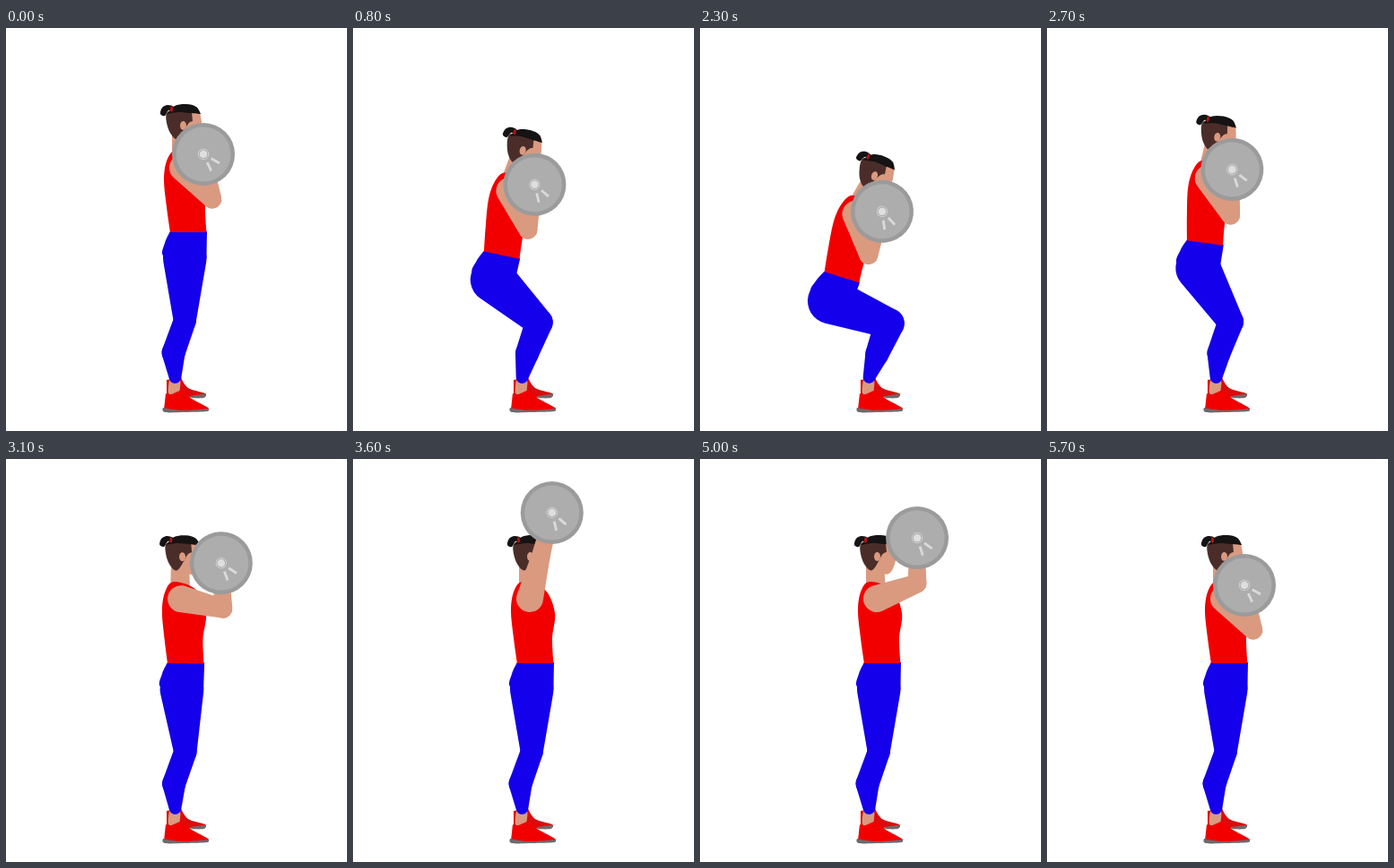
These frames come from a looping animation (380 by 450 pixels, 5.8 s). An HTML page with a canvas:

```html
<!DOCTYPE html>
<html lang="en">
<head>
<meta charset="utf-8">
<title>Squat and press</title>
<style>
html, body { margin: 0; width: 100%; height: 100%; overflow: hidden; background: #fff; }
canvas { display: block; width: 380px; height: 450px; }
</style>
</head>
<body>
<canvas id="stage" width="380" height="450"></canvas>
<script>
const ctx = document.getElementById('stage').getContext('2d');
const SKIN = '#d99a80', RED = '#f20000', BLUE = '#1400ea', SOLE = '#6e6a6c';
const HAIR = '#151313', STUBBLE = '#4a2d29';
const STEP = 100, STEPS = 58;
const SHIN = 72, THIGH = 70, UPPER_ARM = 48, FOREARM = 51;
const ANKLE = [188, 398], SHOULDER = [197, 156];
const RAD = Math.PI / 180;

const clamp = v => Math.max(0, Math.min(1, v));
const ease = (t, from, span) => (1 - Math.cos(Math.PI * clamp((t - from) / span))) / 2;
const polar = ([x, y], angle, r) => [x + r * Math.cos(angle), y + r * Math.sin(angle)];

// Thigh angle from vertical, in degrees: sink, hold, rise.
const squat = t => 88 * (Math.sin(Math.PI / 2 * clamp(t / 16)) ** 1.8 - ease(t, 18.7, 14));
// Overhead press, 0 at the shoulders and 1 at the top.
const press = t => ease(t, 27, 11) - ease(t, 45, 11.5);

function joints(thigh) {
  const knee = polar(ANKLE, (-81 + thigh * .14) * RAD, SHIN);
  const hip = polar(knee, (-90 - thigh) * RAD, THIGH);
  return { knee, hip };
}
const STAND = joints(0);

// Smooth closed shape from x,y pairs; the listed points stay sharp.
function blob(p, color, corners = []) {
  const n = p.length / 2;
  const at = i => { const j = (i + n) % n * 2; return [p[j], p[j + 1]]; };
  const tan = i => {
    if (corners.includes((i + n) % n)) return [0, 0];
    const [a, b] = [at(i - 1), at(i + 1)];
    return [(b[0] - a[0]) / 6, (b[1] - a[1]) / 6];
  };
  ctx.beginPath();
  ctx.moveTo(p[0], p[1]);
  for (let i = 0; i < n; i++) {
    const [a, b, s, e] = [at(i), at(i + 1), tan(i), tan(i + 1)];
    ctx.bezierCurveTo(a[0] + s[0], a[1] + s[1], b[0] - e[0], b[1] - e[1], b[0], b[1]);
  }
  ctx.fillStyle = color;
  ctx.fill();
}

// Two discs and the skin stretched between them.
function limb([x1, y1], r1, [x2, y2], r2, color) {
  const a = Math.atan2(y2 - y1, x2 - x1);
  const b = Math.acos((r1 - r2) / Math.hypot(x2 - x1, y2 - y1));
  ctx.beginPath();
  ctx.arc(x1, y1, r1, a + b, a - b + 2 * Math.PI);
  ctx.arc(x2, y2, r2, a - b, a + b);
  ctx.fillStyle = color;
  ctx.fill();
}

function oval(x, y, rx, ry, color) {
  ctx.beginPath();
  ctx.ellipse(x, y, rx, ry, 0, 0, 2 * Math.PI);
  ctx.fillStyle = color;
  ctx.fill();
}

function feet() {
  blob([179,393, 195,390, 203,402, 222,408, 221,412, 179,412], '#dc0a0c', [0, 1, 4, 5]);
  blob([206,411, 222,409, 220,413, 207,413], SOLE);
  limb([188, 396], 6.5, [187, 405], 6.5, SKIN);
  blob([178,408, 184,409, 196,405, 207,414, 225,424, 224,428, 176,427], RED, [0, 5, 6]);
  blob([175,424, 197,427, 225,425, 224,428, 200,429, 177,429], SOLE, [0, 2]);
}

function leg({ knee, hip }, thigh) {
  const kneeR = 12.5 + thigh * .06;
  const calf = [(knee[0] + ANKLE[0]) / 2 - 7 + thigh * .07, (knee[1] + ANKLE[1]) / 2];
  limb(hip, 24.3 + thigh * .02, knee, kneeR, BLUE);
  limb(knee, kneeR, calf, 13, BLUE);
  limb(calf, 13, [188.5, 390], 6.8, BLUE);
}

function head() {
  blob([200,93, 214,93, 217,99, 218,113, 212,127, 202,128, 192,122], SKIN);
  blob([179,95, 193,91, 207,94, 208,104, 203,107, 195,121, 189,124, 181,113], STUBBLE, [2, 3]);
  oval(197.5, 109, 3.5, 5, SKIN);
  blob([180,96, 188,87, 201,85, 212,88, 217,96, 205,95, 192,94], HAIR, [0, 4]);
  blob([172,96, 174,89, 180,86, 187,88, 187,93, 181,92, 177,98], HAIR);
  oval(184.5, 90.5, 1.5, 3.2, '#b51318');
}

function arm(hand) {
  const dx = hand[0] - SHOULDER[0], dy = hand[1] - SHOULDER[1], d = Math.hypot(dx, dy);
  const bend = Math.acos(Math.min(1, (UPPER_ARM ** 2 + d * d - FOREARM ** 2) / (2 * UPPER_ARM * d)));
  const elbow = polar(SHOULDER, Math.atan2(dy, dx) + bend, UPPER_ARM);
  limb(SHOULDER, 15, elbow, 10.5, SKIN);
  limb(elbow, 10.5, hand, 8, SKIN);
}

function plate([x, y], turn) {
  oval(x, y, 35, 35, '#9b9b9b');
  oval(x, y, 30.5, 30.5, '#adadad');
  ctx.strokeStyle = '#dadada';
  ctx.lineWidth = 2.8;
  for (const deg of [29, 65]) {
    const a = (deg + turn) * RAD;
    ctx.beginPath();
    ctx.moveTo(...polar([x, y], a, 10));
    ctx.lineTo(...polar([x, y], a, 20.5));
    ctx.stroke();
  }
  oval(x, y, 6.2, 6.2, '#d0d0d0');
  oval(x, y, 5.2, 5.2, '#a2a2a2');
  oval(x, y, 4.4, 4.4, '#dedede');
}

// The upper body is laid out standing and leans about the hip.
function upperBody(hip, lean, lift) {
  const nod = lean * .4;
  const hand = [
    220 - 8 * lift + 28 * Math.sin(Math.PI * clamp(lift)) ** .8 + lean * .25,
    141 - 88 * lift + lean * .2
  ];
  ctx.save();
  ctx.translate(...hip);
  ctx.rotate(lean * RAD);
  ctx.translate(-STAND.hip[0], -STAND.hip[1]);
  blob([183,227, 224,227, 223.5,257, 199,265, 175.5,255, 177,240], BLUE, [0, 1, 2]);
  limb([195 + nod, 117], 10, [196, 148], 11, SKIN);
  blob([183,228, 179,200, 176,168, 180,146, 190,137, 214,146, 225,172, 222,200, 223.5,228], RED, [0, 8]);
  ctx.translate(nod, 0);
  head();
  ctx.translate(-nod, 0);
  arm(hand);
  plate(hand, 12 * lift);
  ctx.restore();
}

function draw(t) {
  const thigh = squat(t), body = joints(thigh);
  ctx.fillStyle = '#fff';
  ctx.fillRect(0, 0, 380, 450);
  feet();
  leg(body, thigh);
  upperBody(body.hip, thigh * .25, press(t));
}

const start = performance.now();
function tick() {
  draw(Math.floor((performance.now() - start) / STEP) % STEPS);
  requestAnimationFrame(tick);
}
tick();
</script>
</body>
</html>
```
